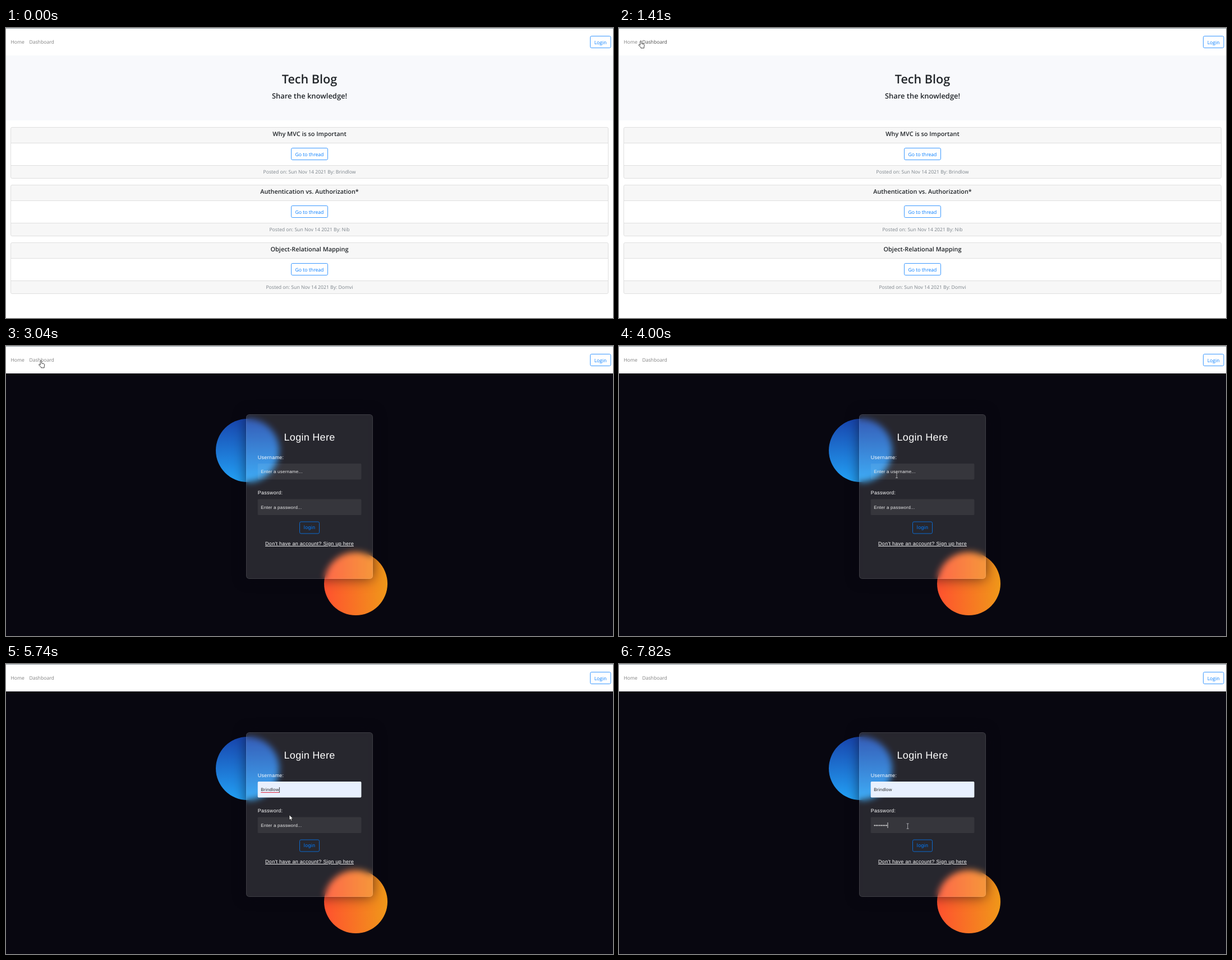
Recreate the animation shown at these times as an HTML page. Size 1082 by 518 pixels, loop 8000 ms.

```html
<!DOCTYPE html>
<html lang="en">
<head>
<meta charset="utf-8">
<title>Tech Blog</title>
<style>
  html, body { margin: 0; width: 100%; height: 100%; overflow: hidden; background: #fff; }
  #backdrop { position: absolute; inset: 49px 0 0; background: #080710; }
  #backdrop div { position: absolute; box-sizing: border-box; }
  .ball { width: 113px; height: 113px; border-radius: 50%; }
  .blue { left: 374px; top: 81px; background: linear-gradient(#1845ad, #23a2f6); }
  .orange { left: 567px; top: 319px; background: linear-gradient(to right, #ff512f, #f09819); }
  .glass {
    left: 428px; top: 73px; width: 226.4px; height: 294.4px;
    border: 1.1px solid rgba(255, 255, 255, .1); border-radius: 5.6px;
    background: rgba(255, 255, 255, .13);
    backdrop-filter: blur(5.6px);
    box-shadow: 0 0 22.5px rgba(8, 7, 16, .6);
  }
  svg { position: absolute; left: 0; top: 0; display: block; }
  text { font: 8.63px "Open Sans", "Noto Sans", sans-serif; text-rendering: geometricPrecision; white-space: pre; }
  .mid { text-anchor: middle; }
  .head { font-weight: 600; fill: #212529; }
  .nav { fill: rgba(0, 0, 0, .5); }
  .nav.hover { fill: rgba(0, 0, 0, .72); }
  .muted { fill: #7b838a; }
  .btn { fill: none; stroke: #3a98ff; }
  .btnText { fill: #007bff; }
  #login text { font-family: "Liberation Sans", Arial, sans-serif; font-size: 9.02px; letter-spacing: .28px; fill: #fff; }
  #login .field { font-size: 7.89px; fill: #eee; }
  #login .value { fill: #222; }
  #login .btnText { fill: #007bff; }
  #login #menu text { font: 600 7px "Open Sans", "Noto Sans", sans-serif; letter-spacing: 0; }
  .box { fill: #fff; fill-opacity: .07; }
  .box.filled { fill: #e8f0fe; fill-opacity: 1; }
</style>
</head>
<body>
<div id="backdrop">
  <div class="ball blue"></div>
  <div class="ball orange"></div>
  <div class="glass"></div>
</div>

<svg width="1082" height="518" viewBox="0 0 1082 518">
  <g id="blog">
    <rect y="49" width="1082" height="469" fill="#fff"/>
    <rect y="49" width="1082" height="116" fill="#f8f9fc"/>
    <text class="head mid" x="541" y="99" style="font-size:21.6px">Tech Blog</text>
    <text class="head mid" x="541" y="126.4" style="font-size:12.95px">Share the knowledge!</text>
    <g id="cards"></g>
  </g>

  <g id="login">
    <text class="mid" x="541" y="169.4" style="font-size:18.03px">Login Here</text>
    <text x="448.7" y="201.7">Username:</text>
    <rect id="userBox" class="box" x="448.7" y="210" width="184.7" height="28.4" rx="1.7"/>
    <text id="userText" class="field" x="454.3" y="227.2"></text>
    <path id="spell" d="M454.3 229.5h32.6" stroke="#e0263c"/>
    <text x="448.7" y="265.2">Password:</text>
    <rect class="box" x="448.7" y="273.6" width="184.7" height="28.4" rx="1.7"/>
    <text id="passText" class="field" x="454.3" y="290.8"></text>
    <g id="menu">
      <rect x="448.7" y="239" width="184.7" height="51.5" fill="#292a2d"/>
      <rect id="pick" x="448.7" y="244" width="184.7" height="20" fill="#3d3f43"/>
      <text x="455.5" y="256.6">Brindlow</text>
      <text x="455.5" y="276.9">Nib</text>
    </g>
    <rect id="caret" width=".8" height="10"/>
    <rect class="btn" x="523.5" y="314" width="35" height="21" rx="2.3" style="stroke:#0d6bd0"/>
    <text class="btnText mid" x="541.1" y="327.2">login</text>
    <text class="mid" x="541" y="356" text-decoration="underline">Don't have an account? Sign up here</text>
  </g>

  <rect width="1082" height="1" fill="#8b959c"/>
  <text id="home" class="nav" x="8.5" y="28.4">Home</text>
  <text id="dash" class="nav" x="41.4" y="28.4">Dashboard</text>
  <rect class="btn" x="1041.5" y="14.5" width="36.5" height="21" rx="2.3"/>
  <text class="btnText mid" x="1059.6" y="28.5">Login</text>

  <g id="cursor" stroke-linejoin="round">
    <path id="arrow" d="M0 0V9.3L2.1 7.4 3.6 10.8 5.2 10.1 3.8 6.8H6.7Z" fill="#fff" stroke="#111" stroke-width=".8"/>
    <path id="hand" d="M-1.3 7V1.2a1.2 1.2 0 0 1 2.4 0V4.9l4 .9q1.2.4 1.1 1.9l-.6 3.5v1.7H0v-1.4L-3.6 8.4q-.9-1.4.3-1.9 1 0 2 1.3z" fill="#fff" stroke="#111" stroke-width=".8"/>
    <path id="beam" d="M-2-4.5H2M0-4.5v9M-2 4.5H2" fill="none" stroke="#c4c4c8" stroke-width=".8"/>
  </g>
</svg>

<script>
  const LOOP = 8000, STEP = 69, BLINK = 530, LOGIN_AT = 3040;
  const USER = 'Brindlow';
  const $ = id => document.getElementById(id);
  const show = (id, on) => { $(id).style.display = on ? '' : 'none'; };

  const posts = [
    ['Why MVC is so Important', USER],
    ['Authentication vs. Authorization*', 'Nib'],
    ['Object-Relational Mapping', 'Domvi']
  ];
  $('cards').innerHTML = posts.map(([title, author], i) => `
    <g transform="translate(0 ${103 * i})">
      <path d="M9 177.5h1064v28H9zM9 245h1064v23H9z" fill="#f7f7f7"/>
      <path d="M9 205.5h1064M9 245.5h1064" stroke="#dfdfdf"/>
      <rect x="8.5" y="177.5" width="1065" height="91" rx="2.3" fill="none" stroke="#dfdfdf"/>
      <text class="head mid" x="541" y="193.2" style="font-size:10.85px">${title}</text>
      <rect class="btn" x="508.5" y="214.5" width="65" height="21" rx="2.3"/>
      <text class="btnText mid" x="541" y="228.6">Go to thread</text>
      <text class="muted mid" x="541" y="260.2">Posted on: Sun Nov 14 2021 By: ${author}</text>
    </g>`).join('');

  // Pointer path: time, x, y, shape
  const path = [
    [380, 1050, 502, 'arrow'], [1140, 203, 45, 'arrow'], [1340, 62, 26, 'hand'],
    [1410, 39, 23, 'hand'], [1620, 20, 23, 'hand'], [1950, 24, 23, 'hand'],
    [2230, 62, 25, 'hand'], [2510, 62, 25, 'arrow'], [2770, 60, 19, 'hand'],
    [2840, 62, 25.5, 'arrow'], [3040, 62.5, 26, 'hand'], [3300, 70, 30, 'arrow'],
    [4000, 495, 231, 'beam'], [4070, 495, 234, 'beam'], [4530, 495, 236, 'beam'],
    [5060, 496, 239, 'beam'], [5130, 497, 242, 'arrow'], [5190, 498, 244, 'arrow'],
    [5400, 499, 254, 'arrow'], [5540, 499, 255, 'arrow'], [5740, 505, 269.5, 'arrow'],
    [5940, 508, 276, 'beam'], [6080, 514, 289, 'beam'], [6280, 514.6, 289.6, 'beam']
  ];
  // Waypoints after which the pointer travels; after the others it rests.
  const travel = new Set([380, 1140, 1410, 1950, 3300, 5190, 5540, 5940]);
  const ease = p => p * (2 - p);
  const smooth = p => p * p * (3 - 2 * p);

  const keyTimes = [6830, 6900, 7100, 7230, 7360, 7490, 7620, 7820];

  function pointer(t) {
    const i = path.findLastIndex(w => w[0] <= t);
    if (i < 0) return null;
    let [t0, x, y, shape] = path[i];
    if (travel.has(t0)) {
      const [t1, x1, y1] = path[i + 1];
      let p = Math.floor((t - t0) / STEP) * STEP / (t1 - t0);
      p = t0 === 3300 ? smooth(p) : ease(p);
      x += (x1 - x) * p;
      y += (y1 - y) * p;
    }
    return { x, y, shape };
  }

  function drawCaret(t, typed) {
    let x = 454.3, y = 220, from = 4070, light = true;
    if (t >= 6080) {
      y = 283;
      x += 3.04 * typed;
      from = typed ? keyTimes[typed - 1] : 6080;
    } else if (t >= 5540) {
      x = 486.9;
      from = 5540;
      light = false;
    }
    const on = t >= 4070 && (t < 5940 || t >= 6080) && (t - from) % (2 * BLINK) < BLINK;
    show('caret', on);
    $('caret').setAttribute('x', x);
    $('caret').setAttribute('y', y);
    $('caret').setAttribute('fill', light ? '#fff' : '#111');
  }

  function render(t) {
    const onLogin = t >= LOGIN_AT;
    show('blog', !onLogin);
    show('login', onLogin);
    show('backdrop', onLogin);

    const c = pointer(t);
    show('cursor', c);
    if (c) {
      $('cursor').setAttribute('transform', `translate(${c.x} ${c.y})`);
      for (const s of ['arrow', 'hand', 'beam']) show(s, s === c.shape);
    }
    const inNav = c && !onLogin && c.y < 40;
    $('home').classList.toggle('hover', !!inNav && t >= 1950 && c.x < 37.5);
    $('dash').classList.toggle('hover', !!inNav && c.x >= 37.5 && c.x < 90);

    const filled = t >= 5330;
    $('userBox').classList.toggle('filled', filled);
    $('userText').classList.toggle('value', filled);
    $('userText').textContent = filled ? USER : 'Enter a username...';
    show('spell', t >= 5610 && t < 5940);
    show('menu', t >= 4070 && t < 5540);
    show('pick', filled);

    const typed = keyTimes.filter(k => k <= t).length;
    $('passText').textContent = typed ? '•'.repeat(typed) : 'Enter a password...';
    drawCaret(t, typed);
  }

  function tick() {
    render(performance.now() % LOOP);
    requestAnimationFrame(tick);
  }
  tick();
</script>
</body>
</html>
```
